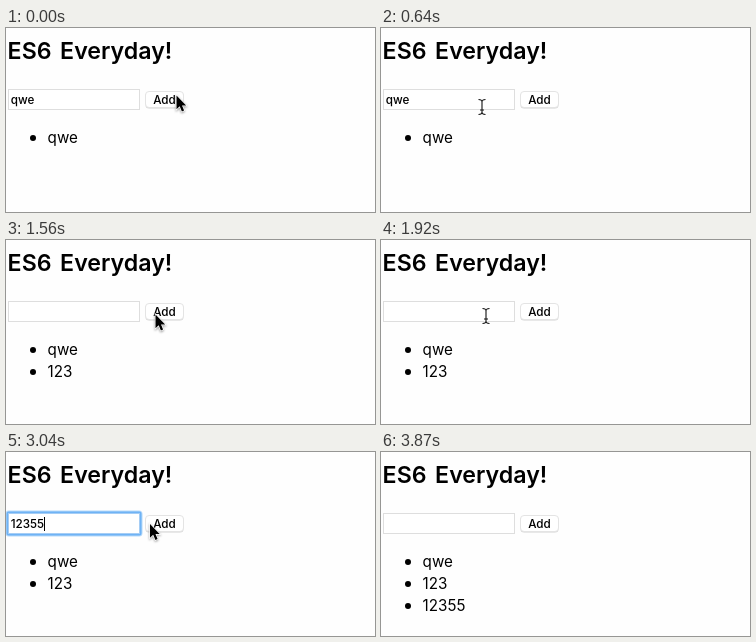
These frames come from a looping animation (369x184 px, 4230 ms). An HTML page:

```html
<!DOCTYPE html>
<html lang="en">
<head>
<meta charset="utf-8">
<title>ES6 Everyday!</title>
<style>
html, body { margin: 0; width: 100%; height: 100%; overflow: hidden; background: #fefefe; }
svg { display: block; width: 369px; height: 184px; }
text { font: 15.2px Inter, sans-serif; white-space: pre; }
.title { font-size: 23.2px; font-weight: 600; word-spacing: 2.7px; }
.control { font-size: 11.7px; font-weight: 500; }
</style>
</head>
<body>
<svg viewBox="0 0 369 184">
  <defs>
    <linearGradient id="blue" x2="0" y2="1">
      <stop stop-color="#6cb3fa"/><stop offset="1" stop-color="#0a6cff"/>
    </linearGradient>
  </defs>
  <text class="title" x="1.6" y="31">ES6 Everyday!</text>

  <g id="ring" fill="none" stroke="#6fb3f5">
    <rect x="1" y="60" width="134" height="23" rx="2" stroke-width="3" opacity=".5"/>
    <rect x="1.5" y="60.5" width="133" height="22" rx="1" stroke-width="2"/>
  </g>
  <rect id="field" x="2.5" y="61.5" width="131" height="20" fill="#fff"/>
  <rect id="selection" x="5" y="64" width="23" height="15" fill="#b4d5fe"/>
  <text id="value" class="control" x="4.7" y="76"></text>
  <rect id="caret" y="65" width="1" height="14"/>

  <rect x="139.5" y="64" width="38" height="16.5" rx="3.5" fill="#d4d4d4"/>
  <rect id="button" x="139.5" y="63.5" width="38" height="16" rx="3.5" stroke="#e4e4e4"/>
  <text id="label" class="control" x="158.5" y="76" text-anchor="middle">Add</text>

  <g id="list"></g>

  <path id="arrow" d="M0 0V13.8L3.2 10.8L5.4 16L7.6 15L5.5 10H9.7Z" stroke="#fff" stroke-width="1.4" paint-order="stroke" style="filter:drop-shadow(0 1px 1px #0006)"/>
  <g id="beam" fill="none">
    <path d="M-3.5 -7.5Q0 -7.5 0 -5V5Q0 7.5 -3.5 7.5M3.5 -7.5Q0 -7.5 0 -5V5Q0 7.5 3.5 7.5M-2 3H2" stroke="#fff" stroke-width="2.4"/>
    <path d="M-3.5 -7.5Q0 -7.5 0 -5V5Q0 7.5 -3.5 7.5M3.5 -7.5Q0 -7.5 0 -5V5Q0 7.5 3.5 7.5M-2 3H2" stroke="#111" stroke-width="1.1"/>
  </g>
</svg>
<script>
const LOOP = 4230;
const $ = id => document.getElementById(id);
const show = (id, on) => $(id).setAttribute('visibility', on ? 'visible' : 'hidden');

// Each step changes only the named parts of the state and holds until the next.
const start = { pointer: 'arrow', at: [170.5, 67.5], value: 'qwe', items: ['qwe'], focus: false, selected: false, pressed: false };
const press = { focus: false, pressed: true };
const steps = [
  [60, { at: [168, 67] }],
  [360, { at: [160, 69] }],
  [420, { at: [147, 70] }],
  [480, { at: [126, 79], pointer: 'beam' }],
  [530, { at: [112, 80] }],
  [590, { at: [104, 80] }],
  [640, { at: [101, 79] }],
  [760, { focus: true }],
  [870, { selected: true }],
  [990, { value: '1', selected: false }],
  [1050, { value: '12' }],
  [1100, { value: '123' }],
  [1280, { at: [108, 78] }],
  [1340, { at: [128, 76] }],
  [1390, { at: [144, 73], pointer: 'arrow' }],
  [1450, { at: [149.5, 74.5] }],
  [1500, press],
  [1560, { value: '', items: ['qwe', '123'], pressed: false }],
  [1800, { at: [140, 74] }],
  [1860, { at: [116, 76], pointer: 'beam' }],
  [1920, { at: [105, 76] }],
  [1980, { focus: true }],
  [2100, { value: '12' }],
  [2210, { value: '123' }],
  [2390, { at: [107, 76] }],
  [2450, { at: [116, 76] }],
  [2510, { at: [125, 76], value: '1235' }],
  [2570, { value: '12355' }],
  [2750, { at: [128, 76] }],
  [2810, { at: [132, 75] }],
  [2870, { at: [138, 73], pointer: 'arrow' }],
  [2920, { at: [142, 72] }],
  [2980, { at: [143, 72] }],
  [3040, { at: [144, 72] }],
  [3100, { ...press, at: [142, 72] }],
  [3160, { value: '', items: ['qwe', '123', '12355'], pressed: false }],
  [3460, { at: [170, 92] }],
  [3520, { at: [236, 130] }],
  [3580, { at: [281, 149] }],
  [3820, { at: [309, 170] }],
  [3870, { pointer: '' }],
];

function draw(s) {
  $('value').textContent = s.value;
  $('caret').setAttribute('x', Math.round(5 + (s.value ? $('value').getComputedTextLength() : 0)));
  show('caret', s.focus && !s.selected);
  show('ring', s.focus);
  show('selection', s.selected);
  $('field').setAttribute('stroke', s.focus ? '#a5cdf5' : '#dedede');
  $('button').setAttribute('fill', s.pressed ? 'url(#blue)' : '#fff');
  $('label').setAttribute('fill', s.pressed ? '#fff' : '#000');
  $('list').innerHTML = s.items.map((item, i) =>
    `<circle cx="27" cy="${110 + 22 * i}" r="3"/><text x="41.6" y="${115 + 22 * i}">${item}</text>`).join('');
  for (const id of ['arrow', 'beam']) {
    show(id, s.pointer === id);
    $(id).setAttribute('transform', `translate(${s.at})`);
  }
}

let shown = -1;
function tick() {
  const t = performance.now() % LOOP;
  const count = steps.filter(([time]) => time <= t).length;
  if (count !== shown) {
    shown = count;
    draw(Object.assign({}, start, ...steps.slice(0, count).map(step => step[1])));
  }
  requestAnimationFrame(tick);
}
tick();
</script>
</body>
</html>
```
